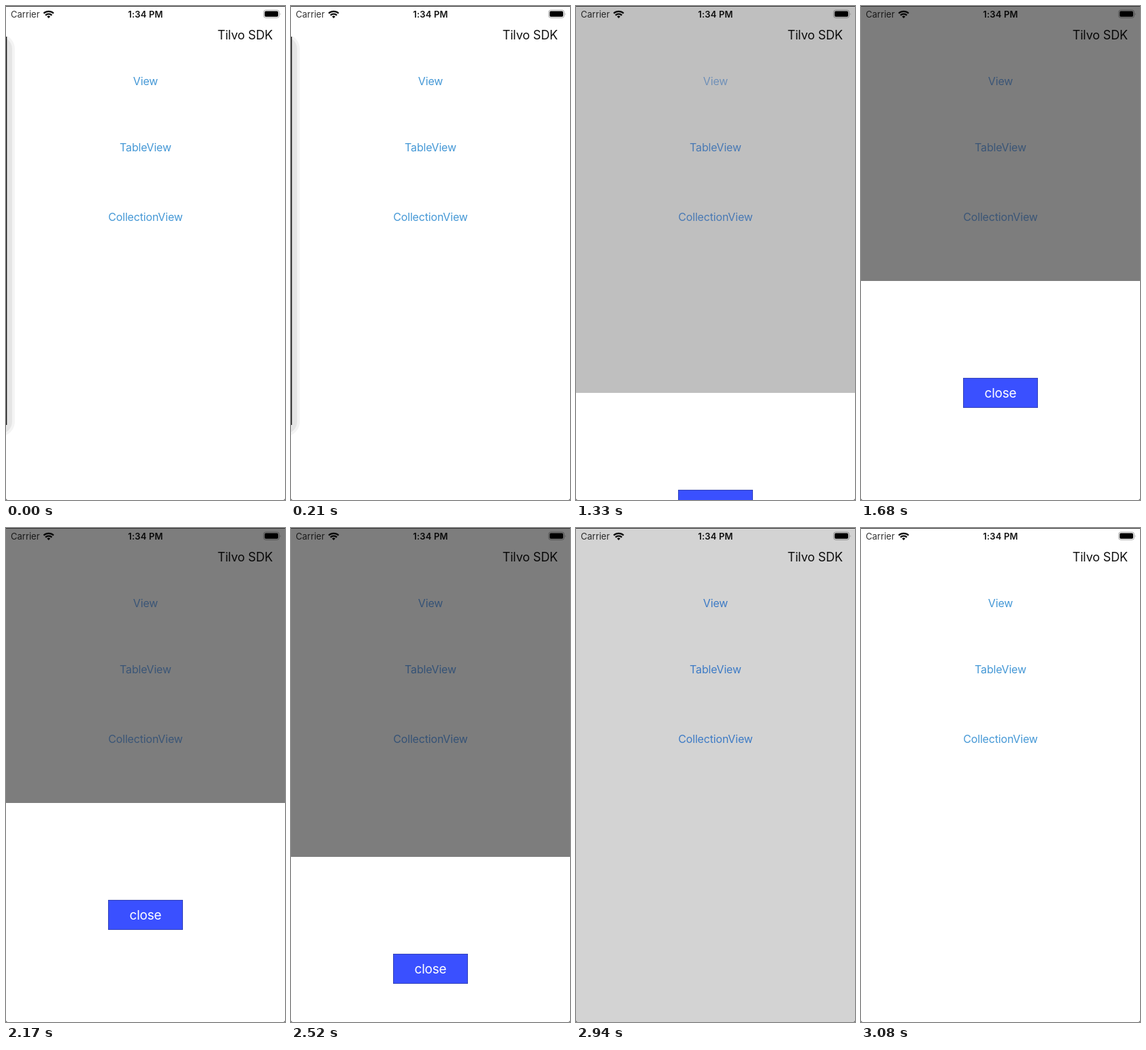
Recreate the animation shown at these times as an HTML page. Size 410 px wide and 724 px high, loop 3850 ms.

```html
<!DOCTYPE html>
<html lang="en">
<head>
<meta charset="utf-8">
<title>Bottom sheet demo</title>
<style>
  html, body { margin: 0; width: 100%; height: 100%; overflow: hidden; background: #fff; }
  svg { display: block; width: 410px; height: 724px; font-family: Inter, "Open Sans", sans-serif; }
  .link { font-size: 16px; letter-spacing: -.18px; text-anchor: middle; }
  .status { font-size: 13px; fill: #333; }
  .clock { font-weight: 600; letter-spacing: .2px; fill: #111; text-anchor: middle; }
  .title { font-size: 18px; letter-spacing: -.15px; fill: #111; text-anchor: end; }
  .close { font-size: 19px; letter-spacing: -.2px; fill: #fff; text-anchor: middle; }
</style>
</head>
<body>
<svg viewBox="0 0 410 724">
  <rect width="410" height="724" fill="#fff"/>

  <g id="drawer">
    <rect x="-40" y="41" width="53" height="590" rx="22" fill="#f4f4f4"/>
    <rect x="-40" y="45" width="49" height="582" rx="18" fill="#e5e5e5"/>
    <rect y="45" width="1.3" height="569" fill="#111"/>
  </g>

  <text class="status" x="7" y="17">Carrier</text>
  <g fill="none" stroke="#111" stroke-width="2.3">
    <path d="M55.4 10.8a10.4 10.4 0 0 1 14.6 0"/>
    <path d="M58 13.6a6.6 6.6 0 0 1 9.4 0"/>
    <path d="M62.7 18l-2.4-2.5a3.5 3.5 0 0 1 4.8 0z" fill="#111" stroke="none"/>
  </g>
  <text class="status clock" x="205" y="17">1:34 PM</text>
  <rect x="378.5" y="6" width="23" height="11.3" rx="3.2" fill="none" stroke="#aaa"/>
  <rect x="380" y="7.6" width="20" height="8.2" rx="1.8" fill="#000"/>
  <path d="M402.8 9.7q1.6 2 0 4z" fill="#aaa"/>

  <text class="title" x="392" y="49.4">Tilvo SDK</text>
  <g id="links">
    <text class="link" id="view" x="205" y="115.6">View</text>
    <text class="link" x="205" y="213">TableView</text>
    <text class="link" x="205" y="314.8">CollectionView</text>
  </g>

  <rect id="dim" y="1" width="410" height="723" opacity="0"/>

  <g id="sheet">
    <rect y="403" width="410" height="321" fill="#fff"/>
    <rect x="150.5" y="545.5" width="109" height="43" fill="#3a50ff" stroke="#3645b8"/>
    <text class="close" x="205" y="574">close</text>
  </g>

  <rect width="410" height="1" fill="#333"/>
  <path d="M0 722v2h2zM410 722v2h-2z" fill="#777"/>
</svg>
<script>
const LOOP = 3850, STEP = 70, SHEET_HEIGHT = 321, MAX_DIM = 0.51;
const PRESS = 1050, OPEN = 1240, OPENED = 1680, CLOSE = 2423, FADE = 2726;
const [drawer, links, view, dim, sheet] =
  ["drawer", "links", "view", "dim", "sheet"].map(id => document.getElementById(id));

const clamp = x => Math.min(1, Math.max(0, x));
const phase = (t, start, length) => clamp((t - start) / length);
const easeInOut = x => x * x * (3 - 2 * x);

// Critically damped spring, settled once the sheet is fully open.
function spring(t) {
  if (t <= OPEN) return 0;
  if (t >= OPENED) return 1;
  const k = (t - OPEN) * 0.01826;
  return 1 - (1 + k) * Math.exp(-k);
}

function draw(t) {
  const opened = spring(t);
  const shown = opened * (1 - easeInOut(phase(t, CLOSE, 300)));
  const shade = opened * (1 - easeInOut(phase(t, FADE, 350)));

  drawer.setAttribute("visibility", t < PRESS ? "visible" : "hidden");
  view.setAttribute("opacity", t < PRESS ? 1 : 0.17 + 0.83 * phase(t, OPEN, 150));
  // Link tint turns bluer under the shade and fades behind the open sheet.
  links.setAttribute("fill", shade > 0 ? "#4a94ee" : "#4598d6");
  links.setAttribute("opacity", 1 - 0.25 * shown);
  dim.setAttribute("opacity", MAX_DIM * shade);
  sheet.setAttribute("transform", `translate(0 ${Math.round(SHEET_HEIGHT * (1 - shown))})`);
  sheet.setAttribute("visibility", shown > 0 ? "visible" : "hidden");
}

const begin = performance.now();
function tick() {
  const t = (performance.now() - begin) % LOOP;
  draw(Math.floor(t / STEP) * STEP);
  requestAnimationFrame(tick);
}
tick();
</script>
</body>
</html>
```
